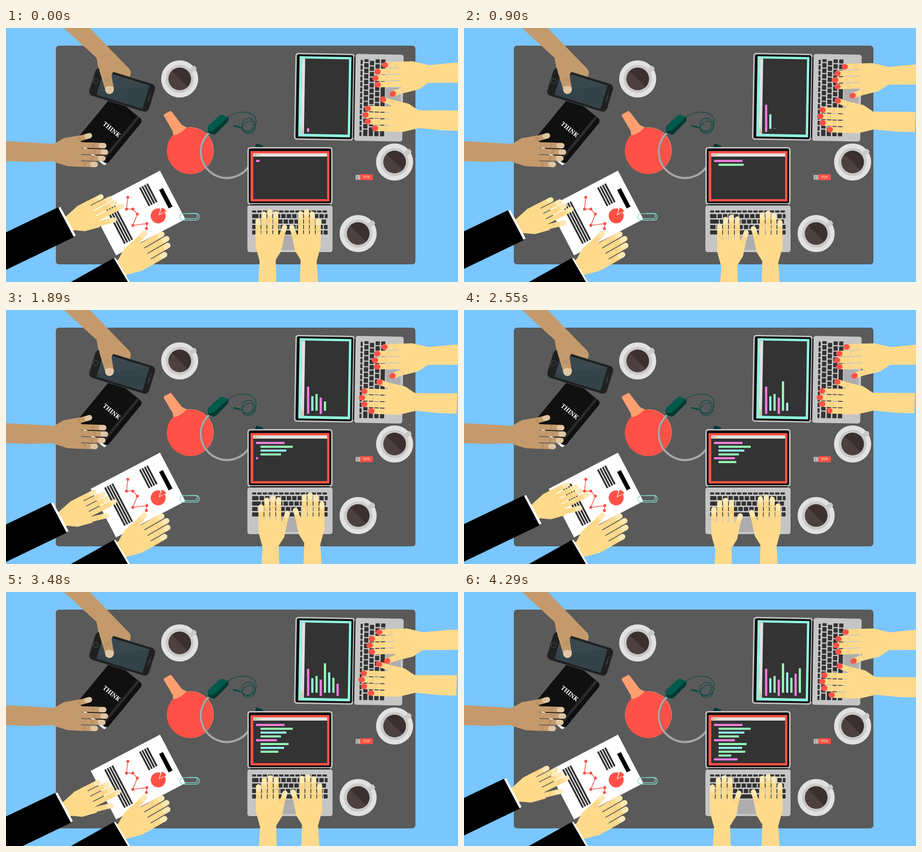
Recreate the animation shown at these times as an HTML page. Size 998 by 561 pixels, loop 4.32 s.

```html
<!DOCTYPE html>
<html lang="en">
<head>
<meta charset="utf-8">
<title>Busy desk</title>
<style>
  html, body { margin: 0; width: 100%; height: 100%; overflow: hidden; background: #7ac6ff; }
  svg { display: block; width: 100%; height: 100%; }
</style>
</head>
<body>
<svg id="stage" viewBox="0 0 998 561" preserveAspectRatio="none"></svg>
<script>
const LOOP = 4320, STEP = 30;
const RED = '#ff5147', INK = '#333', SILVER = '#c5c5c5', GREEN = '#00493f';
const PALE = { skin: '#ffda8b', tip: '#ffe8b4', band: '#f0c987' };
const TAN = { skin: '#c49a6c', tip: '#dfc5a5', band: '#ae865c' };
const POLISH = { ...PALE, tip: RED, nail: true };

// --- drawing helpers ---
const rect = (x, y, w, h, fill, rx = 0, more = '') =>
  `<rect x="${x}" y="${y}" width="${w}" height="${h}" rx="${rx}" fill="${fill}" ${more}/>`;
const circle = (x, y, r, fill) => `<circle cx="${x}" cy="${y}" r="${r}" fill="${fill}"/>`;
const path = (d, fill) => `<path d="${d}" fill="${fill}"/>`;
const stroke = (d, color, w, cap = 'round') =>
  `<path d="${d}" fill="none" stroke="${color}" stroke-width="${w}" stroke-linecap="${cap}" stroke-linejoin="round"/>`;
const arc = (x, y, r, from, sweep, color, w) =>
  `<circle cx="${x}" cy="${y}" r="${r}" fill="none" stroke="${color}" stroke-width="${w}" pathLength="360"
    stroke-dasharray="${sweep} ${360 - sweep}" transform="rotate(${from} ${x} ${y})"/>`;
const group = (transform, inner) => `<g transform="${transform}">${inner}</g>`;
const repeat = (n, draw) => Array.from({ length: n }, (_, i) => draw(i)).join('');

// A finger runs from its root to its tip, with a crease and a lighter end.
function finger(x1, y1, x2, y2, tone) {
  const w = 11.3, len = Math.hypot(x2 - x1, y2 - y1), ux = (x2 - x1) / len, uy = (y2 - y1) / len;
  const at = d => `${x2 - ux * d} ${y2 - uy * d}`;
  return stroke(`M${x1} ${y1}L${at(0)}`, tone.skin, w) +
    stroke(`M${at(20)}L${at(21.2)}M${at(23)}L${at(24.2)}`, tone.band, w * 0.75, 'butt') +
    stroke(`M${at(tone.nail ? 1 : 5)}L${at(tone.nail ? -1 : 0)}`, tone.tip, w - 0.5);
}

// One left hand pointing up from the wrist; every other hand is this one turned or mirrored.
function hand({ x, y, turn = 0, size = 1, flip = 1, arm = 110, tone = PALE, thumb = 72, point = 102 }) {
  const reach = [86, 101, 106, point];
  return group(`translate(${x} ${y}) rotate(${turn}) scale(${flip * size} ${size})`,
    path(`M-27-57H23L27-52L37-54L30-20L17.5 0L19 48L20 ${arm}H-21V48L-18 3L-27-30Z`, tone.skin) +
    finger(24, -32, 37, -thumb, tone) +
    reach.map((r, i) => finger(-21.5 + 13 * i, -45, -21.5 + 13 * i, -r, tone)).join(''));
}

const cup = (x, y) => group(`translate(${x} ${y})`,
  circle(0, 0, 41, '#e1e1e1') + circle(0, 0, 31, '#c9c9c9') +
  group('rotate(-36)', rect(22, -5, 22, 10, '#c9c9c9', 3)) +
  circle(0, 0, 25, '#4d4040') + path('M-17.7-17.7A25 25 0 0 1 17.7 17.7Z', '#3b2f30'));

function keyboard() {
  let out = '';
  for (let row = 0; row < 5; row++) {
    const y = row ? 136 + row * 12 : 140, first = 9 + (row * 5) % 12;
    for (let x = 10.5, w = first; x < 174; x += w + 2.4, w = 9.6) {
      if (row === 4 && x > 50 && x < 62) w = 64;
      out += rect(x, y, Math.min(w, 177 - x), row ? 9 : 4.5, INK, 0.8);
    }
  }
  return out;
}

const laptop = frame =>
  rect(0, 0, 188, 127, SILVER, 6) + rect(3, 3, 182, 121, '#111', 4) +
  rect(7, 9, 174, 111, frame) + rect(13, 14, 163, 101, INK) + rect(13, 14, 163, 7, '#e2e2e2') +
  [RED, '#63d66b', '#f2c14e'].map((c, i) => circle(17 + i * 4.3, 17.5, 1.4, c)).join('') +
  rect(6, 126, 176, 4, '#222') + rect(0, 129, 188, 103, SILVER, 5) + keyboard() +
  rect(71, 195, 45, 32, '#adadad', 1);

// --- desk objects ---
const phone = group('translate(256.5 136.7) rotate(17)',
  rect(-69, -32, 138, 64, '#202020', 10, 'stroke="#454545" stroke-width="1"') +
  rect(-51, -27, 106, 54, '#344349') + path('M-51-27H55L-51 20Z', '#3a484e') +
  '<circle cx="-61.5" cy="-1.5" r="5.5" fill="none" stroke="#555"/>' +
  rect(61, -7, 2, 14, '#484848', 1) + circle(62, -12, 1.3, '#484848'));

const notebook = group('translate(224 163) rotate(39.5)',
  rect(6, 90, 79, 23, '#eee', 4) +
  rect(0, -18, 87, 126, '#101010', 8) + rect(71, -17, 6, 125, '#2b2b2b') +
  '<text x="46" y="46" text-anchor="middle" font-family="Noto Serif, Liberation Serif, serif" font-weight="700" font-size="13.4" fill="#fff">THINK</text>');

const paddle =
  path('M349 195Q347 192 350 190L361 184Q364 182 366 185L392 219L374 238Z', '#ff9f70') +
  circle(407, 270.8, 51.5, '#ff9f70') + circle(406.3, 271.2, 51.3, RED) +
  path('M370 237Q386 234 399 219.5L388 214L368 230Z', '#ff9f70');

const headset =
  stroke('M489 198C512 180 550 182 552 204C556 226 530 238 522 224C514 206 536 190 548 206C558 232 532 240 524 228C514 210 548 196 546 214C544 232 528 230 520 221L505 217', GREEN, 1.3) +
  stroke('M503 216L516 219', GREEN, 3) +
  arc(488, 273.5, 57.5, 30, 196, '#a9a9a9', 5) + arc(488, 273.5, 55.5, 30, 196, '#777', 1) +
  path('M446 217L472 193Q475 191 478 192L490 197Q493 200 490 207L463 234Q460 236 457 235L447 232Q445 230 446 217Z', '#003a31') +
  path('M446 217L472 193Q475 191 478 192L490 197L458 227L447 228Z', '#005a4c') +
  path('M553 255L568 260L566 268H548Z', '#003a31');

const stripes = (x, y, h) => repeat(4, i => rect(x + i * 6, y, 4, h, INK));
const dots = [[269, 374], [266, 400], [280, 400], [290, 411], [280, 436], [311, 432], [310, 443]];
const report =
  group('translate(187 395) rotate(-27.6)',
    rect(0, 0, 172.6, 121, '#fff') + stripes(27.5, 12, 95) + stripes(114, 12.5, 46) +
    rect(151, 37, 9.5, 46, '#000')) +
  stroke('M' + dots.join('L'), RED, 1.6) + dots.map(([x, y]) => circle(x, y, 3.2, RED)).join('') +
  circle(336, 415, 16.5, RED) + path('M337 414L342 396L355 404Z', '#fff') +
  path('M339 411L344 397Q351 399 354 405Z', RED) + stroke('M338 413L344 397M338 413L354 405', '#ffb38a', 1);

const clip = stroke('M393 421H420A7.5 7.5 0 0 0 420 410H391A7 7 0 0 0 391 424.5H421A7.8 7.8 0 0 0 421 409.5H404', '#82dfcf', 1.7);

const stick = rect(772, 324.5, 11, 10.5, '#b9b9b9') + rect(775, 327, 2, 2, '#777') + rect(775, 331, 2, 2, '#777') +
  rect(782, 323, 28, 13, RED, 1.5) +
  '<text x="796" y="332.4" text-anchor="middle" font-family="Liberation Mono, monospace" font-weight="700" font-size="8.4" fill="#ffb98f">OVK</text>';

// --- arms and hands ---
const phoneArm = path('M127-1H184L240 57L272 90Q277 96 275 102L272 114L230 112L206 100L200 66Z', TAN.skin);
const thumb = path('M200 65L207 97L218.5 134A9.6 9.6 0 0 0 238 135L233 104L241 88L232 66Z', TAN.skin) +
  path('M219 131Q228 125 238 131V137A9.6 9.6 0 0 1 219 138Z', TAN.tip) +
  repeat(3, i => stroke(`M${217 + i} ${112 + i * 3}l12-2`, TAN.band, 1));

const bookHand = hand({ x: 105, y: 275, turn: 92, size: 1.08, flip: -1, tone: TAN });
const reader = hand({ x: 143, y: 431, turn: 63, arm: 20, thumb: 88, point: 116 }) +
  path('M114 398L120 395L154 458L148 462Z', '#fff') + path('M-60 480L115 396L150 462L-60 563Z', '#000');
const lowerHand = hand({ x: 258, y: 527, turn: 60, size: 1.08, flip: -1, arm: 15 }) +
  path('M236 509L242 508L275 563H266Z', '#fff') + path('M138 564L238 508L271 564Z', '#000');

// --- typed lines: pink ones start at the margin, the others are indented ---
const COLORS = { p: '#f57fe0', l: '#98ffb6', a: '#98f4f0' };
const listing = (hues, sizes) => sizes.map((size, i) => ({ size, color: COLORS[hues[i]], indent: hues[i] !== 'p' }));
const code = listing('plalplallp', [63, 71, 57, 45, 46, 62, 52, 59, 28, 52]);
const bars = listing('palplalpl', [60, 32, 37, 36, 65, 45, 33, 49, 54]);

// --- moving parts: key points are [time, dx, dy] ---
const parts = [
  { art: reader, sway: 0,
    keys: [[0, 0, 0], [900, -18, 6.5], [1890, -16, 30], [2550, 17, 13.5], [3120, -16, 30], [3840, 3, 65.5], [4290, -27, 16.5]] },
  { art: hand({ x: 932, y: 102, turn: -92, size: 1.1, flip: -1, tone: POLISH }), sway: 1.5,
    keys: [[0, 0, 0], [900, 4, 4], [1890, -1, 0], [2550, 8, 0], [3120, -10, 7], [3840, -15.5, 7], [4290, 6, 7]] },
  { art: hand({ x: 910, y: 201, turn: -88, size: 1.1, arm: 85, tone: POLISH }), sway: 2,
    keys: [[0, 0, 0], [900, -7, 3], [2550, -8, 1], [3840, -7, 2.5], [4290, -3, 6]] },
  { art: hand({ x: 578, y: 512 }), sway: 2.5,
    keys: [[0, 0, 0], [900, 8, 12], [1890, 6.5, 9], [2550, -5, 14.5], [3120, 2, 7.5], [3840, 0, 1], [4290, -8, 4.5]] },
  { art: hand({ x: 668, y: 512, flip: -1 }), sway: 2.5,
    keys: [[0, 0, 0], [900, 8, 3], [1890, 8, 2.5], [2550, 4, 7], [3120, 4, 1.5], [3840, 2, 2], [4290, 8, 1.5]] }
];
const [readerArt, ...typists] = parts.map(p => `<g class="part">${p.art}</g>`);

document.getElementById('stage').innerHTML =
  rect(0, 0, 998, 561, '#7ac6ff') + rect(110, 39, 794, 483, '#5a5a5a', 7) +
  notebook + phoneArm + phone + thumb + bookHand + paddle + headset +
  cup(383.5, 112.5) + cup(858, 296) + cup(777.5, 454) + stick +
  group('translate(533 263)', laptop(RED)) +
  group('translate(757 152.8) rotate(-89) scale(1.02 1.03) translate(-94 -116)', laptop('#8ff8e2')) +
  code.map((l, i) => rect(552 + l.indent * 10, 291.3 + i * 8.45, 0, 4.6, l.color, 0, 'class="code"')).join('') +
  bars.map((l, i) => rect(664.7 + i * 9.3, 0, 4.8, 0, l.color, 0, 'class="bar"')).join('') +
  report + clip + readerArt + lowerHand + typists.join('');

const partNodes = document.querySelectorAll('.part');
const codeNodes = document.querySelectorAll('.code'), barNodes = document.querySelectorAll('.bar');

// Eases between key points; the sway is zero at each of them.
function move(node, { keys, sway }, t) {
  const i = Math.max(1, keys.findIndex(key => key[0] > t));
  const [t0, x0, y0] = keys[i - 1], [t1, x1, y1] = keys[i];
  const k = (t - t0) / (t1 - t0), ease = (1 - Math.cos(Math.PI * k)) / 2;
  const s = sway * Math.sin(2 * Math.PI * Math.round((t1 - t0) / 330) * k);
  node.setAttribute('transform', `translate(${x0 + (x1 - x0) * ease + s} ${y0 + (y1 - y0) * ease + s * 0.4})`);
}

// Typing runs at a steady pace from the first stroke to the last.
function type(lines, t, draw) {
  const total = lines.reduce((sum, l) => sum + l.size, 0);
  let left = 8 + (total - 8) * t / (LOOP - STEP);
  lines.forEach((line, i) => {
    draw(i, Math.max(0, Math.min(line.size, left)), line);
    left -= line.size;
  });
}

function render(t) {
  // The last step rests just short of the closing key point.
  const held = Math.min(t, LOOP - STEP - 0.01);
  parts.forEach((part, i) => move(partNodes[i], part, held));
  type(code, t, (i, n) => codeNodes[i].setAttribute('width', n));
  type(bars, t, (i, n, line) => {
    barNodes[i].setAttribute('y', 229.5 - line.indent * 7 - n);
    barNodes[i].setAttribute('height', n);
  });
}

const start = performance.now();
function tick() {
  const t = Math.max(0, performance.now() - start) % LOOP;
  render(Math.floor(t / STEP) * STEP);
  requestAnimationFrame(tick);
}
render(0);
requestAnimationFrame(tick);
</script>
</body>
</html>
```
